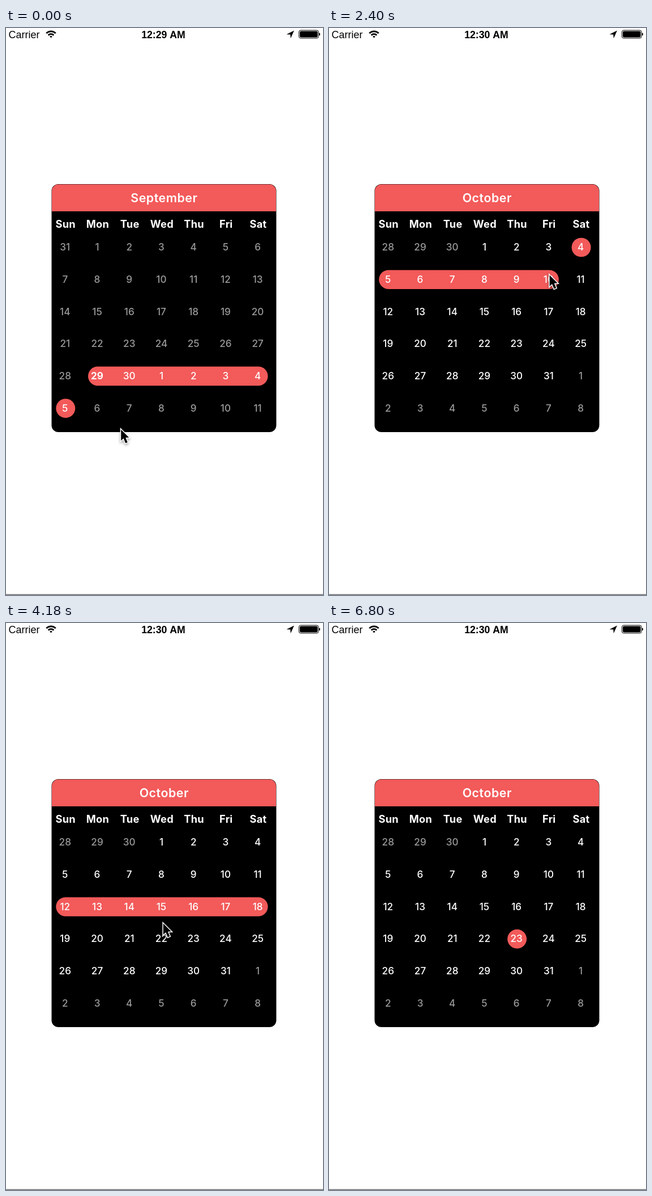
Animation, 560 px wide and 999 px high, one loop 7340 ms. Source, as an HTML page with a canvas:

```html
<!DOCTYPE html>
<html lang="en">
<head>
<meta charset="utf-8">
<title>Calendar range selection</title>
<style>
  html, body { margin: 0; width: 100%; height: 100%; overflow: hidden; background: #fff; }
  canvas { display: block; }
</style>
</head>
<body>
<canvas id="stage" width="560" height="999"></canvas>
<script>
const ctx = document.getElementById('stage').getContext('2d');
const LOOP = 7340, OCTOBER_AT = 800, POINTER_GONE_AT = 6800;
const RED = '#f35a5a', GREY = '#999', STEP = 56.72, LEFT = 104.3, TOP = 386.3;
const DAYS = ['Sun', 'Mon', 'Tue', 'Wed', 'Thu', 'Fri', 'Sat'];
const TODAY = 29, MONTH_SHIFT = 28;

// Key points of the pointer tip
const PATH = [
  { t: 0, x: 202, y: 705 }, { t: 300, x: 108, y: 668 }, { t: 740, x: 305, y: 664 },
  { t: 1360, x: 270, y: 658 }, { t: 1540, x: 300, y: 486 }, { t: 2090, x: 223, y: 440 },
  { t: 2400, x: 388, y: 433 }, { t: 2560, x: 458, y: 448 }, { t: 3100, x: 110, y: 499 },
  { t: 3220, x: 222, y: 498 }, { t: 3840, x: 447, y: 496 }, { t: 4180, x: 277, y: 527 },
  { t: 4600, x: 148, y: 550 }, { t: 4980, x: 224, y: 485 }, { t: 5400, x: 222, y: 496 },
  { t: 6140, x: 218, y: 554 }, { t: 6460, x: 330, y: 553 }, { t: 6600, x: 332, y: 553 },
  { t: 6800, x: 474, y: 545 }
];

// While the button is down, the range ends at the cell under the pointer
const DRAGS = [
  { down: 300, up: 540, days: 7 }, { down: 2160, up: 2560, days: 7 },
  { down: 3120, up: 3840, days: 7 }, { down: 5080, up: 5180, days: 3 },
  { down: 6000, up: 6460, days: 1 }
];

const colX = i => LEFT + STEP * i;
const rowY = r => TOP + STEP * r;
const slope = (i, axis) => (PATH[i + 1][axis] - PATH[i][axis]) / (PATH[i + 1].t - PATH[i].t);

function tangent(i, axis) {
  if (i === 0 || i === PATH.length - 1) return 0;
  const a = slope(i - 1, axis), b = slope(i, axis);
  return a * b > 0 ? 2 * a * b / (a + b) : 0;
}

// Monotone cubic along the path, without overshoot
function along(t, axis) {
  const i = PATH.findLastIndex(p => p.t <= t);
  const from = PATH[i], to = PATH[i + 1];
  if (!to) return from[axis];
  const h = to.t - from.t, u = (t - from.t) / h, v = 1 - u;
  return from[axis] * (1 + 2 * u) * v * v + to[axis] * u * u * (3 - 2 * u)
    + h * u * v * (tangent(i, axis) * v - tangent(i + 1, axis) * u);
}

function selection(t) {
  const drag = DRAGS.findLast(d => d.down <= t) || { down: 300, up: 300, days: 7 };
  const at = Math.max(drag.down, Math.min(t, drag.up));
  const col = Math.round((along(at, 'x') - LEFT) / STEP);
  const row = Math.round((along(at, 'y') - TOP) / STEP);
  const turned = t >= OCTOBER_AT && at < OCTOBER_AT;
  const last = row * 7 + col - (turned ? MONTH_SHIFT : 0);
  return [last - drag.days + 1, last];
}

function text(str, x, y, font, color, align = 'center', spacing = 0) {
  ctx.font = font;
  ctx.fillStyle = color;
  ctx.textAlign = align;
  ctx.letterSpacing = spacing + 'px';
  ctx.fillText(str, x, y);
}

function roundBox(x, y, w, h, radius, color) {
  ctx.fillStyle = color;
  ctx.beginPath();
  ctx.roundRect(x, y, w, h, radius);
  ctx.fill();
}

function polygon(points) {
  ctx.beginPath();
  points.forEach(([x, y]) => ctx.lineTo(x, y));
  ctx.closePath();
}

function statusBar(clock) {
  text('Carrier', 4.5, 17.5, '18px "Liberation Sans", sans-serif', '#000', 'left');
  text(clock, 278, 17.5, 'bold 17.7px "Liberation Sans", sans-serif', '#000');

  ctx.strokeStyle = '#000';
  ctx.lineWidth = 2.8;
  for (let radius = 2; radius < 12; radius += 4.8) {
    ctx.beginPath();
    ctx.arc(79.5, 17.5, radius, -Math.PI * 0.75, -Math.PI * 0.25);
    ctx.stroke();
  }

  ctx.fillStyle = '#000';
  polygon([[509, 4.5], [495.5, 11.3], [502.3, 11.6], [502.8, 18.3]]);
  ctx.fill();

  ctx.lineWidth = 1;
  ctx.beginPath();
  ctx.roundRect(517.5, 4, 34.5, 14, 3);
  ctx.stroke();
  roundBox(519, 5.5, 31.5, 11, 2, '#000');
  roundBox(553, 8.5, 1.8, 5, [0, 2, 2, 0], '#000');
}

function calendar(october, first, last) {
  roundBox(80.5, 275, 397, 437, 12, '#000');
  roundBox(81, 275.6, 396, 47.4, [11.5, 11.5, 0, 0], RED);
  text(october ? 'October' : 'September', 279.3, 307.3, '600 21.4px Inter, sans-serif', '#fff', 'center', 0.5);
  DAYS.forEach((day, i) =>
    text(day, colX(i) + 0.9, 351.8, '700 18.3px Inter, sans-serif', '#fff', 'center', 0.2));

  for (let row = 0; row < 6; row++) {
    const a = Math.max(first, row * 7), b = Math.min(last, row * 7 + 6);
    if (a <= b) roundBox(colX(a % 7) - 16, rowY(row) - 16.6, (b - a) * STEP + 34, 33.6, 17, RED);
  }

  for (let i = 0; i < 42; i++) {
    const date = new Date(2014, october ? 9 : 8, october ? i - 2 : i);
    const selected = i >= first && i <= last;
    const bright = selected || (october && date.getMonth() === 9);
    const weight = !october && i === TODAY ? 700 : 500;
    text(date.getDate(), colX(i % 7), rowY(Math.floor(i / 7)) + 5.8,
      weight + ' 17.2px Inter, sans-serif', bright ? '#fff' : GREY);
  }
}

function pointer(x, y) {
  ctx.save();
  ctx.translate(x + 1.2, y + 2.5);
  polygon([[0, 0], [0, 19.5], [4.4, 15.5], [8, 24], [11.6, 22.4], [8.1, 14.2], [14, 14]]);
  ctx.lineWidth = 3;
  ctx.strokeStyle = '#fff';
  ctx.shadowColor = 'rgba(0,0,0,.4)';
  ctx.shadowBlur = 4;
  ctx.shadowOffsetY = 2;
  ctx.stroke();
  ctx.shadowColor = 'transparent';
  ctx.fillStyle = '#000';
  ctx.fill();
  ctx.restore();
}

function draw() {
  const t = performance.now() % LOOP;
  const october = t >= OCTOBER_AT;

  ctx.fillStyle = '#fff';
  ctx.fillRect(0, 0, 560, 999);
  statusBar(october ? '12:30 AM' : '12:29 AM');
  calendar(october, ...selection(t));
  ctx.fillStyle = '#777';
  ctx.fillRect(0, 997.5, 560, 1.5);
  if (t < POINTER_GONE_AT) pointer(along(t, 'x'), along(t, 'y'));

  requestAnimationFrame(draw);
}
draw();
</script>
</body>
</html>
```
